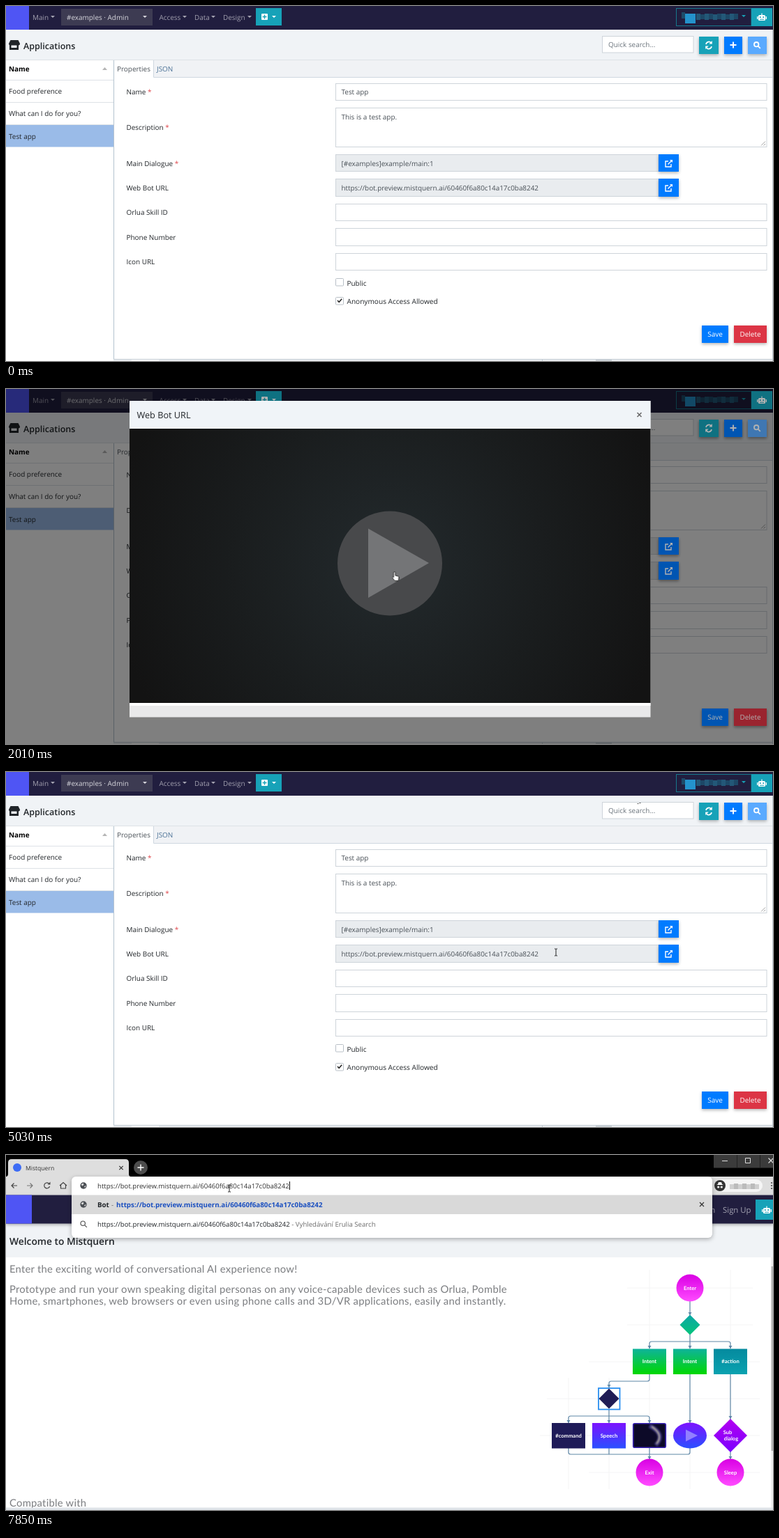
These frames come from a looping animation (1099 px wide and 510 px high, 8000 ms). An HTML page:

```html
<!DOCTYPE html>
<html lang="en">
<head>
<meta charset="utf-8">
<title>Web bot demo</title>
<style>
html, body { margin: 0; width: 100%; height: 100%; overflow: hidden; background: #fff; }
svg { display: block; width: 1099px; height: 510px; }
text { font-family: "Open Sans", "Noto Sans", sans-serif; text-rendering: geometricPrecision; white-space: pre; }
.geo { font-family: Lato, "Open Sans", sans-serif; }
.mid { text-anchor: middle; }
.bold { font-weight: 700; }
.semi { font-weight: 600; }
.wire { fill: none; stroke: #5f87a6; stroke-width: 1.2; }
.lift { filter: drop-shadow(0 2px 2px rgba(0, 0, 0, .28)); }
.glow { filter: blur(1px); }
</style>
</head>
<body>
<svg id="stage" viewBox="0 0 1099 510" xmlns="http://www.w3.org/2000/svg"></svg>
<script>
const LOOP = 8000;
const BLUE = '#007bff', TEAL = '#17a2b8', NAVY = '#211e3f', INK = '#212529';
const BOT_URL = 'https://bot.preview.mistquern.ai/60460f6a80c14a17c0ba8242';

// Drawing helpers
const text = (x, y, s, fill = INK, size = 9.95, cls = '', extra = '') =>
  `<text x="${x}" y="${y}" fill="${fill}" font-size="${size}" class="${cls}" ${extra}>${s}</text>`;
const rect = (x, y, x2, y2, fill, extra = '') =>
  `<rect x="${x}" y="${y}" width="${x2 - x}" height="${y2 - y}" fill="${fill}" ${extra}/>`;
const circle = (x, y, r, fill, extra = '') => `<circle cx="${x}" cy="${y}" r="${r}" fill="${fill}" ${extra}/>`;
const path = (d, fill = 'none', extra = '') => `<path d="${d}" fill="${fill}" ${extra}/>`;
const line = (d, color, width = 1) => path(d, 'none', `stroke="${color}" stroke-width="${width}"`);
const group = (id, body, extra = '') => `<g id="${id}" ${extra}>${body}</g>`;
const diamond = (x, y, r, fill) => path(`M${x} ${y - r}l${r} ${r}l${-r} ${r}l${-r} ${-r}z`, fill);
const caret = (x, y, fill = '#a7a6b4') => path(`M${x} ${y}h6l-3 3z`, fill);
const cross = (x, y, r, color, w = 1.2) =>
  line(`M${x - r} ${y - r}l${2 * r} ${2 * r}m0 ${-2 * r}l${-2 * r} ${2 * r}`, color, w);
const field = (y, y2, fill = '#fff', x2 = 1090) => rect(472.5, y + .5, x2, y2 + .5, fill, 'stroke="#ced4da"');
const linear = (id, a, b) =>
  `<linearGradient id="${id}" x2="0" y2="1"><stop stop-color="${a}"/><stop offset="1" stop-color="${b}"/></linearGradient>`;
const robot = (x, y) => rect(x - 5, y - 3, x + 5, y + 5, '#fff', 'rx="1.5"') +
  rect(x - 7, y - 1, x - 5.6, y + 3, '#fff') + rect(x + 5.6, y - 1, x + 7, y + 3, '#fff') +
  rect(x - .6, y - 5.5, x + .6, y - 3, '#fff') +
  circle(x - 2.2, y, 1.1, TEAL) + circle(x + 2.2, y, 1.1, TEAL) + rect(x - 3, y + 2.7, x + 3, y + 3.7, TEAL);
const lens = (x, y, color, w) => line(`M${x + 1.8} ${y + 1.8}l3 3`, color, w) +
  circle(x - .8, y - .8, 3.2, 'none', `stroke="${color}" stroke-width="${w}"`);
const globe = (x, y) => circle(x, y, 4.7, '#4b4f54') +
  path(`M${x - 3.5} ${y - 1.5}l3 -2l1 2l-2 2zM${x + 1} ${y + 1}l3 -1l-2 3z`, '#ddd');
const openLink = y => line(`M949 ${y - 3}h-4v8h8v-4`, '#fff', 1.4) +
  line(`M948.5 ${y + 1.5}l5 -5`, '#fff', 1.5) + path(`M951 ${y - 5}h4v4z`, '#fff');

const defs = `<defs>
  ${linear('pink', '#d900e4', '#ff4cff')}${linear('mint', '#0ba7a6', '#05c47a')}
  ${linear('green', '#0eb39b', '#00d800')}${linear('sea', '#058a9e', '#0aa2b0')}
  ${linear('violet', '#7c12ff', '#2a50ff')}${linear('purple', '#b400f0', '#7a00ff')}
  <radialGradient id="night" gradientUnits="userSpaceOnUse" cx="550" cy="250" r="400">
    <stop stop-color="#232a2d"/><stop offset=".55" stop-color="#1a1d1e"/><stop offset="1" stop-color="#131313"/></radialGradient>
</defs>`;

// Application form
const mosaic = rect(973, 11, 988, 25, '#2492cc') + rect(968, 9, 973, 18, '#1d4b69') +
  Array.from({length: 10}, (_, i) =>
    rect(989 + i * 6, 11 + (i % 3 === 1), 995 + i * 6, 20 - i % 2, i % 2 ? '#1d4867' : '#235878')).join('');

const topBar = rect(0, 0, 1099, 34, NAVY) + rect(0, 0, 33, 34, '#4f55f4') +
  rect(79, 4, 210, 28, '#3d3b52') + text(87, 20, '#examples · Admin', '#d8d8de') + caret(196, 14, '#d8d8de') +
  [[38, 'Main', 64], [219.5, 'Access', 253], [270, 'Data', 294], [311, 'Design', 346]]
    .map(([x, s, c]) => text(x, 20, s, '#a19fae') + caret(c, 14)).join('') +
  rect(960.5, 3.5, 1068, 28.5, 'none', 'stroke="#17788c"') + mosaic + caret(1054, 13, TEAL);

const accents = group('accents',
  rect(358, 3, 395, 28, TEAL) + rect(366, 11, 375, 20, '#fff', 'rx="1"') +
  line('M370.5 12.5v6m-3 -3h6', TEAL, 1.4) + caret(381, 14, '#fff') +
  rect(1068, 3, 1098, 29, TEAL) + robot(1083, 16) +
  `<g class="lift">${rect(993, 44, 1021, 69, TEAL)}${rect(1029, 44, 1055, 69, BLUE)}${rect(1063, 44, 1090, 69, '#5aaaff')}
  ${rect(935, 213, 964, 238, BLUE)}${rect(935, 248, 964, 274, BLUE)}
  ${rect(997, 459, 1035, 484, BLUE)}${rect(1043, 459, 1090, 484, '#dc3545')}</g>` +
  line('M1003 55a4.2 4.2 0 0 1 7.4 -2m.6 5a4.2 4.2 0 0 1 -7.4 2', '#fff', 1.6) +
  path('M1011.8 50v4.5h-4.5zM1002.2 62v-4.5h4.5z', '#fff') +
  line('M1042 51.500v9m-4.500 -4.500h9', '#fff', 1.9) + lens(1076, 56, '#fff', 1.8) +
  openLink(226) + openLink(261) +
  text(1016, 475, 'Save', '#fff', 10, 'mid') + text(1066.5, 475, 'Delete', '#fff', 10, 'mid'));

const shop = rect(5, 55, 18, 63, INK) + rect(7.5, 56, 15.5, 60, '#f0f3f6') +
  path('M6.500 49h11l2.500 5q0 2.500 -2.500 2.500h-11q-2.500 0 -2.500 -2.500z', INK);

const labels = [[127, 'Name', 1], [178, 'Description', 1], [230, 'Main Dialogue', 1], [265, 'Web Bot URL'],
  [300, 'Orlua Skill ID'], [336, 'Phone Number'], [371, 'Icon URL']]
  .map(([y, s, need]) => text(172.5, y, s + (need ? ' <tspan fill="#e0474c">*</tspan>' : ''))).join('');

const check = y => rect(472.5, y + .5, 483.5, y + 11, '#fff', 'stroke="#b9c0c7" rx="1"');

const app = group('app',
  rect(0, 0, 1099, 510, '#fff') + rect(0, 34, 1099, 77, '#f0f3f6') + topBar +
  shop + text(25, 62, 'Applications', INK, 12.5, 'semi') +
  rect(854.5, 43.5, 985, 67, '#fff', 'stroke="#ced4da"') + text(863, 59, 'Quick search...', '#6c757d') +
  rect(155, 77, 1099, 102, '#f0f2f5') + rect(155, 78, 211, 103, '#fff') +
  line('M0 77.500H1099M0 106.500H154M0 138.500H154M0 170.500H154', '#dde2e6') +
  line('M211.500 78V102.500H1099', '#cfd8e0') +
  rect(0, 171, 154, 202.5, '#9abbe8') + line('M154.500 78V507', '#b4c3cf') +
  text(4, 94, 'Name', '#000', 9.9, 'bold') + path('M138 92h7l-3.500 -4z', '#b5b5b5') +
  text(4, 126, 'Food preference') + text(4, 158, 'What can I do for you?') + text(4, 191, 'Test app') +
  text(159, 94, 'Properties', '#495057') + text(216, 94, 'JSON', '#4a7196') +
  labels + field(111, 135) + field(146, 202) + field(213, 237, '#e9ecef', 935) + field(248, 273, '#e9ecef', 935) +
  field(284, 308) + field(319, 344) + field(355, 379) +
  text(480.5, 127, 'Test app', '#495057') + text(480.5, 163, 'This is a test app.', '#495057') +
  line('M1082 200.500l6 -6m-2.500 6l2.500 -2.500', '#888', .8) +
  text(480.5, 230, '[#examples]example/main:1', '#495057') + text(480.5, 265, BOT_URL, '#495057', 9.87) +
  group('picked', rect(480, 253, 764, 269, '#0078d7') + text(480.5, 265, BOT_URL, '#fff', 9.87)) +
  check(391) + check(418) + line('M475 423l2.200 2.300l4 -4.500', '#222', 1.5) +
  text(488.5, 402, 'Public') + text(488.5, 428, 'Anonymous Access Allowed', INK, 10.1) + accents +
  group('pressed', rect(935, 248, 964, 274, '#0056b3', 'stroke="#6fa8e8" stroke-width="1.5"') + openLink(261)) +
  rect(154, 508, 1099, 510, '#eceff2') + rect(180, 508, 219, 510, '#fff') + rect(845, 508, 868, 510, '#cdd3d8') +
  line('M154 507.500H1099M768.500 507V510M1098.500 34V510', '#c3ccd4') +
  group('crumb', line('M904.500 45.500h2m1 -1h2', '#555')));

const dim = group('dim', rect(0, 0, 1099, 510, '#000', 'opacity=".5"') + '<use href="#accents" opacity=".4"/>');

// Dialog with the bot player
const modal = group('modal',
  rect(177, 17, 923.5, 471.5, '#e9e9ea') + rect(177, 17, 923.5, 57, '#f0f4f8') +
  text(187.5, 42, 'Web Bot URL', INK, 12.7) + cross(907.5, 37, 3, '#666', 1.5) +
  rect(177, 57, 923.5, 451, 'url(#night)') + rect(177, 451, 923.5, 455, '#fff') +
  group('play', circle(550, 250.5, 75, '#48494b') + path('M519 200.500L606 250L519 300z', '#747577')) +
  group('hello', rect(177, 431, 923.5, 451, '#09b20b') +
    text(737, 243, 'Hello, what can I do for', '#fff', 33, 'geo mid', 'letter-spacing=".4"') +
    text(736, 287, 'you?', '#fff', 33, 'geo mid', 'letter-spacing=".4"')));

// Browser with the welcome page
const node = (x, y, s) => text(x, y, s, '#fff', 7.6, 'geo mid bold');
const box = (x, y, fill) => rect(x - 24, y, x + 24, y + 36.5, fill);
const tip = (x, y) => path(`M${x - 2.5} ${y - 4}h5l-2.500 4z`, '#5f87a6');
const columns = [806, 864, 922, 980, 1038];

const picture = rect(898.7, 385.7, 945.3, 420.3, '#0c0a28', 'stroke="#3a24b8" stroke-width="1.6" rx="2"') +
  `<g class="glow">${line('M922 389Q946 401 931 417', '#3d3580', 6)}${line('M925 390Q943 402 932 415', '#b5b09c', 2.2)}</g>`;

const diagram =
  line(columns.map((x, i) => `M${x} ${i < 2 ? 320 : 165}V480`).join('') +
    'M890 191H1070M890 244H1070M835 297H1080M775 350H1080M765 403H1080M835 456H1080', '#f4f4f5') +
  `<g class="wire">${path('M980 210V230M980 258V278M922 278V271q0 -3 3 -3H1035q3 0 3 3V278M922 315V322q0 3 -3 3H867q-3 0 -3 3V334')}
  ${path('M980 315V385M1038 315V380M864 366V385M806 385V378q0 -3 3 -3H919q3 0 3 3V385')}
  ${path('M806 421V427q0 3 3 3H977q3 0 3 -3V421M864 421V430M922 421V437M1038 426V437')}</g>` +
  [[980, 230], [922, 278], [980, 278], [1038, 278], [864, 334], [806, 385], [864, 385], [922, 385], [980, 385],
    [1038, 379], [922, 437], [1038, 437]].map(p => tip(...p)).join('') +
  circle(980, 191, 19.5, 'url(#pink)') + circle(922, 456, 19.5, 'url(#pink)') + circle(1038, 456, 19.5, 'url(#pink)') +
  diamond(980, 244, 14.5, 'url(#mint)') +
  box(922, 278.5, 'url(#green)') + box(980, 278.5, 'url(#green)') + box(1038, 278.5, 'url(#sea)') +
  rect(849, 335, 879.5, 365.5, '#fff', 'stroke="#2a8ff0" stroke-width="1.8"') + diamond(864, 350, 14.5, '#201c55') +
  box(806, 385, '#1f1b58') + box(864, 385, 'url(#violet)') + picture +
  '<ellipse cx="980" cy="403" rx="24" ry="18.5" fill="url(#violet)"/>' + path('M974 394.500v17l17 -8.500z', '#9280ff') +
  diamond(1038, 403, 24, 'url(#purple)') +
  node(980, 193.5, 'Enter') + node(922, 299, 'Intent') + node(980, 299, 'Intent') + node(1038, 299, '#action') +
  node(806, 405.5, '#command') + node(864, 405.5, 'Speech') + node(1034, 401, 'Sub') + node(1039, 410, 'dialog') +
  node(922, 458.5, 'Exit') + node(1038, 458.5, 'Sleep');

const prose = (y, s) => text(5, y, s, '#7b7d80', 14.8, 'geo', 'letter-spacing=".25"');

const browser = rect(0, 0, 1099, 31, '#000') + path('M0 31q3 0 3 -4V11q0 -5 5 -5H171q5 0 5 5V27q0 4 3 4z', '#dedede') +
  circle(16, 18, 6, '#3d6cf5') + text(28, 21.5, 'Mistquern', '#333', 8.6) + cross(165, 18.5, 2.7, '#333') +
  circle(193, 18, 10, '#4d4d4d') + line('M193 13.500v9m-4.500 -4.500h9', '#fff', 1.4) +
  rect(1014, 0, 1099, 18.5, '#3b3b3b') + line('M1047.500 0V18M1080.500 0V18', '#222') +
  line('M1026 8.500h8M1059.500 4.500h7v7h-7z', '#ddd') + cross(1096, 8, 3.5, '#ddd') +
  rect(0, 31, 1099, 57, '#dedede') +
  line('M16 44H8m3.500 -3.500L8 44l3.500 3.500', '#444', 1.2) +
  line('M30 44h8m-3.500 -3.500L38 44l-3.500 3.500', '#777', 1.2) +
  line('M62 41.500a4 4 0 1 0 .6 3.500M77 44l5 -4.500l5 4.500m-8.500 -1v5h7v-5', '#444', 1.2) + path('M63.500 38.500v4h-4z', '#444') +
  rect(98, 34, 1006, 54, '#c8c8c8', 'rx="10"') + rect(108, 43.5, 114, 48, '#444') +
  line('M109.500 44v-2a1.500 1.500 0 0 1 3 0v2', '#444') + text(123, 48, 'app.mistquern.ai', '#333', 9.3) +
  path('M994 38.500l1.600 3.700l4 .3l-3 2.600l1 4l-3.600 -2.200l-3.600 2.200l1 -4l-3 -2.600l4 -.3z', '#1a6cf0') +
  rect(1015, 35, 1084, 53, '#f5f5f5', 'rx="9"') + circle(1023, 44, 8, '#333') +
  path('M1018 43h10l-2 -1l-1 -3h-4l-1 3z', '#fff') + circle(1020.7, 46, 1.6, '#fff') + circle(1025.3, 46, 1.6, '#fff') +
  Array.from({length: 7}, (_, i) => rect(1037 + i * 6, 42 - i % 2, 1043 + i * 6, 49, i % 2 ? '#bbb' : '#cfcfcf')).join('') +
  [40, 44, 48].map(y => circle(1097, y, 1.1, '#444')).join('');

const page = rect(0, 57, 1099, 510, '#fff') + rect(0, 98, 1099, 147, '#f0f3f6') +
  `<g class="lift">${rect(0, 57.5, 1099, 98.5, NAVY)}</g>` + rect(0, 57.5, 37, 98.5, '#4f55f4') +
  text(984, 83, 'Log In', '#a3a2b1', 11.4) + text(1027, 83, 'Sign Up', '#a3a2b1', 11.4) +
  rect(1074, 64, 1099, 93, TEAL) + robot(1090, 79) +
  text(5, 129, 'Welcome to Mistquern', INK, 13.8, 'semi') +
  prose(169, 'Enter the exciting world of conversational AI experience now!') +
  prose(198, 'Prototype and run your own speaking digital personas on any voice-capable devices such as Orlua, Pomble') +
  prose(215, 'Home, smartphones, web browsers or even using phone calls and 3D/VR applications, easily and instantly.') +
  prose(505, 'Compatible with') + diagram +
  rect(1096, 147, 1099, 507, '#eee') + rect(1096.5, 160, 1099, 425, '#b5b5b5') + rect(0, 506.5, 1099, 510, '#dfe4e9');

const focusBar = group('focusBar', rect(98, 34, 1006, 54, '#fff', 'rx="10" stroke="#4a86e8" stroke-width="1.5"') +
  globe(111, 44) + rect(122, 37, 199, 51, '#0078d7') + text(123, 48, 'app.mistquern.ai', '#fff', 9.3));

const suggestions = group('suggestions',
  `<g style="filter:drop-shadow(0 2px 3px rgba(0,0,0,.3))">${rect(94, 31, 1012, 119, '#fff', 'rx="6"')}</g>` +
  rect(94, 57.5, 1012, 85, '#d9d9d9') + globe(111, 44) + globe(111, 71) + lens(111, 99, '#555', 1.2) +
  text(131, 48, BOT_URL, '#333', 9.6) + line('M406.500 38V50', '#111') +
  text(131, 75, 'Bot', INK, 9.75, 'bold') + text(151, 75, '-', '#666', 9.6) + text(158, 75, BOT_URL, '#1a4fc0', 9.75, 'bold') +
  cross(997, 71, 3, '#333') +
  text(131, 102.5, BOT_URL + '<tspan fill="#6d6d6d"> - Vyhledávání Erulia Search</tspan>', INK, 9.65));

const web = group('web', browser + page + focusBar + suggestions);

// Pointer; its hot spot is the group's zero point
const outlined = 'stroke="#222" stroke-width=".9" stroke-linejoin="round"';
const pointer = group('pointer', group('halo', circle(0, 0, 9.5, '#f6f01c', 'opacity=".75"')) +
  group('arrow', path('M0 0v9.500l2.200 -2l1.500 3.500l1.600 -.7l-1.500 -3.400h3z', '#fff', outlined)) +
  group('hand', path('M-1 1q0 -1.500 1.200 -1.500t1.200 1.500v4l4 1q1.200 .4 1 2l-.8 4.500h-5l-3.800 -4.800q.6 -1.500 2.200 -.2z', '#fff', outlined)) +
  group('beam', line('M-2 -5h1.500l.5 .6l.5 -.6h1.500M0 -4.500v9M-2 5h1.500l.5 -.6l.5 .6h1.500', '#222')));

document.getElementById('stage').innerHTML = defs + app + dim + modal + web + pointer;

// Timing: every table lists [time in ms, value]
function track(id, prop, steps, easing = 'linear') {
  const frames = steps.map(([t, v]) => ({ offset: t / LOOP, [prop]: v, easing }));
  document.getElementById(id).animate(frames, { duration: LOOP, iterations: Infinity });
}
const show = (id, ...spans) => track(id, 'opacity',
  [[0, 0], ...spans.flatMap(([from, to]) => [[from, 1], [to, 0]]), [LOOP, 0]], 'steps(1, end)');

const at = (t, x, y) => [t, `translate(${x}px, ${y}px)`];
track('pointer', 'transform', [
  at(0, 766.5, 417.5), at(290, 766.5, 417.5), at(1040, 949, 256), at(1440, 949, 256), at(2010, 556.5, 263),
  at(3150, 556.5, 263), at(3780, 905, 39), at(4120, 905, 39), at(4900, 932, 260), at(5030, 788, 259),
  at(5150, 768, 260), at(5710, 473, 260), at(5940, 473, 260), at(6690, 738, 286), at(6940, 376, 96),
  at(7220, 320, 48), at(LOOP, 320, 48)
], 'ease-in-out');

show('arrow', [0, 980], [1440, 1840], [3250, 3740], [4150, 4750], [6050, 7150]);
show('hand', [980, 1440], [1840, 3250], [3740, 4150]);
show('beam', [4750, 6050], [7150, LOOP]);
show('halo', [1100, 1280], [2300, 2450], [3840, 4120], [5150, 5780]);

show('pressed', [1000, 1500]);
track('dim', 'opacity', [[0, 0], [1160, 0], [1330, 1], [4120, 1], [4290, 0], [LOOP, 0]]);
track('modal', 'opacity', [[0, 0], [1440, 0], [1590, 1], [3945, 1], [3950, .6], [4110, .6], [4120, 0], [LOOP, 0]]);
track('modal', 'transform', [[0, 'translateY(-50px)'], [1440, 'translateY(-50px)'], [1740, 'translateY(0)'],
  [LOOP, 'translateY(0)']], 'ease-out');
track('play', 'opacity', [[0, 1], [2350, 1], [2500, 0], [LOOP, 0]]);
show('hello', [2680, LOOP]);
show('crumb', [4180, 6750]);
track('picked', 'clipPath', [[0, 'inset(0 0 0 100%)'], [5150, 'inset(0 0 0 100%)'], [5710, 'inset(0 0 0 0%)'],
  [LOOP, 'inset(0 0 0 0%)']], 'ease-in-out');

show('web', [6750, LOOP]);
show('focusBar', [7390, LOOP]);
show('suggestions', [7800, LOOP]);
</script>
</body>
</html>
```
